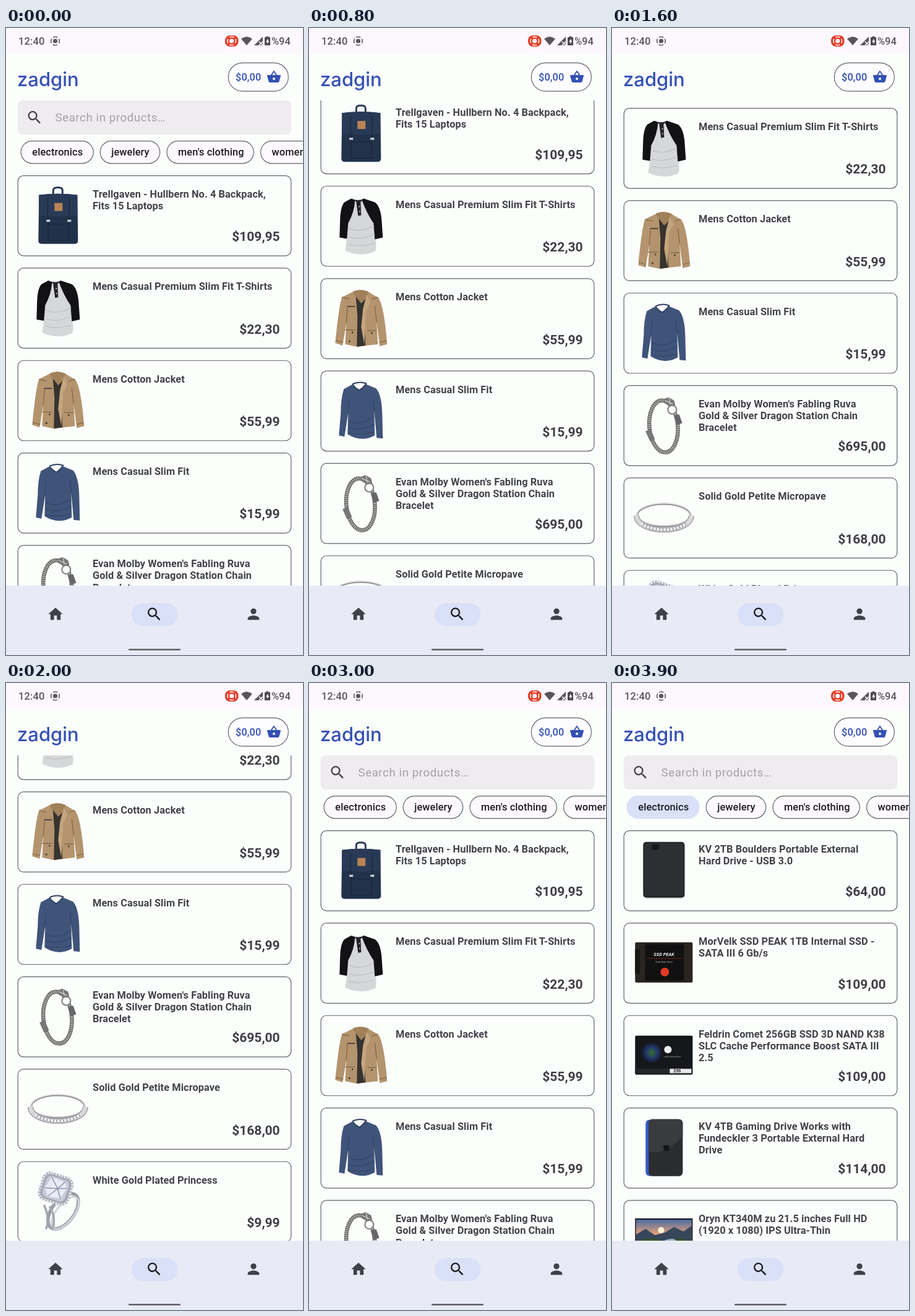
An HTML page that plays this animation: 480 px wide and 1013 px high, repeating every 4400 ms.

```html
<!DOCTYPE html>
<html lang="en">
<head>
<meta charset="utf-8">
<title>Shop search</title>
<style>
  html, body { margin: 0; width: 100%; height: 100%; overflow: hidden; background: #fcfefc; }
  svg { display: block; width: 100vw; height: 100vh; font-family: Roboto, sans-serif; }
  .title { font-size: 16.33px; font-weight: 700; letter-spacing: .09px; fill: #42424a; }
  .price { font-size: 21px; font-weight: 700; fill: #3e3e46; text-anchor: end; }
  .label { font-size: 16.33px; font-weight: 500; letter-spacing: .117px; fill: #1a1b20; }
  .status { font-size: 16.5px; font-weight: 500; fill: #58555b; }
  .hint { font-size: 18.67px; letter-spacing: .583px; fill: #a4a2a8; }
  .logo { font: 500 31px Inter, sans-serif; fill: #3450b4; }
</style>
</head>
<body>
<svg id="stage" viewBox="0 0 480 1013" preserveAspectRatio="none"></svg>
<script>
const LOOP = 4400, STEP = 100;
const PITCH = 149.33, LIST_TOP = 219.33, HEADER = 102.3;
const BG = '#fcfefc', INK = '#3f4149', LINE = '#62636d', BLUE = '#3450b4';

const path = (d, fill, extra = '') => `<path d="${d}" fill="${fill}" ${extra}/>`;
const line = (d, stroke, w = 1, extra = '') => path(d, 'none', `stroke="${stroke}" stroke-width="${w}" ${extra}`);
const box = (x, y, w, h, fill, r = 0, extra = '') =>
  `<rect x="${x}" y="${y}" width="${w}" height="${h}" rx="${r}" fill="${fill}" ${extra}/>`;
const dot = (x, y, r, fill, extra = '') => `<circle cx="${x}" cy="${y}" r="${r}" fill="${fill}" ${extra}/>`;
const oval = (x, y, rx, ry, stroke, w, extra = '') =>
  `<ellipse cx="${x}" cy="${y}" rx="${rx}" ry="${ry}" fill="none" stroke="${stroke}" stroke-width="${w}" ${extra}/>`;
const text = (cls, x, y, s, extra = '') => `<text class="${cls}" x="${x}" y="${y}" ${extra}>${s}</text>`;
const icon = (x, y, scale, d, fill) =>
  `<g transform="translate(${x} ${y}) scale(${scale}) translate(-12 -12)">${path(d, fill)}</g>`;
const outline = `stroke="${LINE}" stroke-width="1.17"`;

const ICONS = {
  home: 'M10 20v-6h4v6h5v-8h3L12 3 2 12h3v8z',
  search: 'M15.5 14h-.79l-.28-.27A6.47 6.47 0 0 0 16 9.5 6.5 6.5 0 1 0 9.5 16c1.61 0 3.09-.59 4.23-1.57l.27.28v.79l5 4.99L20.49 19zm-6 0C7.01 14 5 11.99 5 9.5S7.01 5 9.5 5 14 7.01 14 9.5 11.99 14 9.5 14z',
  person: 'M12 12a4 4 0 1 0 0-8 4 4 0 0 0 0 8zm0 2c-2.67 0-8 1.34-8 4v2h16v-2c0-2.66-5.33-4-8-4z',
  basket: 'M17.21 9l-4.38-6.56a1 1 0 0 0-1.66 0L6.79 9H2a1 1 0 0 0-.96 1.27l2.54 9.27A2 2 0 0 0 5.5 21h13a2 2 0 0 0 1.93-1.46l2.54-9.27A1 1 0 0 0 22 9zM9 9l3-4.4L15 9zm3 8a2 2 0 1 1 0-4 2 2 0 0 1 0 4z'
};

// Product pictures, each in a 93 px square.
const ART = {
  backpack: () =>
    line('M39 14V6q0-5 6-5h3q6 0 6 5v8', '#2b3c57', 3) +
    path('M16 13Q47 9 78 13L79 87Q79 92 73 92H21Q15 92 15 87Z', '#22324b') +
    path('M16 13Q47 9 78 13V46Q47 50 16 46Z', '#283a56') +
    line('M31 49V86H64V49M31 60H64M30 18V54M65 18V54', '#18263b', 1.2) +
    box(28, 53, 6, 3.5, '#c9ced6') + box(62, 53, 6, 3.5, '#c9ced6') +
    box(41, 26, 13, 13, '#b98455'),
  raglan: () =>
    path('M30 3Q40 8 50 3L64 8 70 30 69 64Q73 78 70 87Q46 98 21 86Q26 60 24 34L27 10Z', '#d6d7d9') +
    path('M31 2L20 8Q14 14 13 34L12 65 24 67 26 42Q36 24 37 5Z', '#121215') +
    path('M51 2L69 8Q78 14 80 36L82 65 69 68 67 42Q56 26 48 4Z', '#121215') +
    path('M32 2Q41 7 52 2Q46 9 41 9Z', '#2a2a2e') + path('M39 8L46 7 47 29 42 30Z', '#222226') +
    dot(44, 15, 1, '#ddd') + dot(44.5, 23, 1, '#ddd') +
    line('M28 50Q45 58 68 46M28 64Q44 70 69 60M27 76Q46 81 68 74', '#bfc0c4', 1.3),
  jacket: () =>
    path('M32 4L16 12Q11 25 5 86L17 90 23 54 21 88 40 92 56 90 74 88 72 52 77 91 89 88Q84 26 75 13L58 3Z', '#b3946e') +
    path('M38 6L56 6 51 32 54 90 40 92 41 42Z', '#37332f') +
    path('M33 3Q45 -3 59 3L54 15 47 22 36 8Z', '#a08159') + path('M56 8L62 20 55 34 52 88 47 60 50 30Z', '#c4a57e') +
    line('M23 54L25 26M72 52L69 26M21 65H37M57 66H72M16 12L28 15M64 15L74 12M6 82L18 85M77 85L88 82', '#80633f', 1.2) +
    line('M25 27H37', '#3a342c', 1.6) + dot(28, 83, 1.5, '#3a342c') + dot(33, 69, 1.3, '#3a342c') + dot(64, 70, 1.3, '#3a342c'),
  sweater: () =>
    path('M32 4L19 11Q14 26 14 50L11 86 20 88 26 50 25 84Q47 98 69 86L68 46 72 90 82 91 81 50Q80 20 71 10L54 3 44 13Z', '#40547a') +
    line('M33 3Q36 9 44 13Q51 9 55 2Q44 -2 33 3', '#2f4062', 2) +
    line('M26 50L27 28M68 46L66 26M28 62Q47 72 67 56M27 73Q46 80 68 68M27 82Q48 87 68 80', '#324569', 1.3),
  bracelet: () =>
    oval(46, 48, 23, 42, '#666664', 6.5, 'transform="rotate(-5 46 48)"') +
    oval(46, 48, 23, 42, '#bdbdba', 4.5, 'transform="rotate(-5 46 48)" stroke-dasharray="1.4 1.7"') +
    line('M21 54L28 70', '#77777a', 9) + line('M67 30L72 44', '#66666a', 9) +
    dot(60, 21, 7, BG, 'stroke="#858585" stroke-width="2.2"') +
    path('M45 4L54 1 63 6 65 14 57 15 48 11Z', '#77777a') + line('M48 6L61 12M55 3L57 13', '#d0d0d0', 1.3),
  band: () =>
    oval(46.5, 42, 43, 18, '#8d8c8f', 3) + oval(46.5, 41, 43, 18, '#dedcdf', 1.5) +
    line('M2 43C4 73 89 73 91 43', '#949398', 9) + line('M2 43C4 73 89 73 91 43', '#d9d8dc', 6.5) +
    line('M10 55C28 69 65 69 83 55', '#8b8a90', 4.4) +
    line('M10 55C28 69 65 69 83 55', '#f6f6f9', 3.8, 'stroke-dasharray="4 1.4"'),
  princess: () =>
    oval(55, 62, 18, 33, '#9b9ca6', 5.5, 'transform="rotate(37 55 62)"') +
    oval(58, 65, 14, 31, '#d2d3da', 3, 'transform="rotate(38 58 65)"') +
    line('M24 52Q35 76 27 91M33 54Q44 72 38 90', '#a4a5ad', 3.5) +
    `<g transform="rotate(18 44 26)">` + box(17, 2, 52, 48, '#a5a6b2', 13) +
    box(18.5, 3.5, 49, 45, 'none', 12, 'stroke="#e4e4ea" stroke-width="4" stroke-dasharray="3 1.8"') +
    box(24, 8, 38, 36, '#c7cad9', 8) +
    path('M31 10L54 11 60 20 55 39 34 42 26 30Z', '#e9ebf4') +
    line('M31 10L46 25 54 11M46 25L60 20M46 25L55 39M46 25L34 42M46 25L26 30', '#8e92ab', 1.5) + '</g>',
  drive: () =>
    box(14, 2, 67, 90, '#9b9b9d', 6, 'opacity=".35"') + box(13, 0, 67, 90, '#242527', 5) +
    box(15, 2, 63, 85, '#2e2f32', 4) + box(27, 4, 12, 9, '#191a1c'),
  ssd: () =>
    box(0, 13, 93, 65, '#292521', 2) + box(16, 16, 63, 59, '#111', 1) + box(0, 24, 8, 40, '#191714') +
    text('', 30, 35, 'SSD PEAK', 'font-size="7.4" font-style="italic" font-weight="700" fill="#eee"') +
    line('M18 39H78', '#8c2720', .8) +
    text('', 33, 46, 'Solid State Drive', 'font-size="3.8" fill="#bbb"') +
    dot(48, 61, 7, '#e13a25'),
  flash: () =>
    box(0, 14.5, 93, 63, '#15171b', 2) + dot(27, 42, 17, 'url(#glow)') +
    dot(53, 37, 6, '#eee') +
    text('', 46, 50, 'solid state drive', 'font-size="4" fill="#aaa"') +
    box(0, 67.5, 93, 8, '#23262b') + box(56, 68, 35, 7, '#e9e9e9') +
    text('', 62, 74, '256', 'font-size="7" font-weight="700" fill="#222"'),
  gaming: () =>
    path('M22 1Q17 2 17 8V85Q17 91 24 92L30 90V1Z', '#3559c4') +
    path('M27 0H71Q77 1 77 6V85Q77 91 71 92H27Q22 91 22 86V6Q22 1 27 0Z', '#2b2c2e') +
    path('M27 0H71Q77 1 77 6V28Q46 60 22 52V6Q22 1 27 0Z', '#3a3b3e') + box(46, 42, 9, 9, '#151617'),
  monitor: () =>
    box(0, 11, 93, 60, '#17171a') + box(1.5, 13, 90, 54, 'url(#sky)') +
    path('M1.5 37L17 28 32 38 48 34 63 25 78 32 91.5 23V67H1.5Z', '#37465a') +
    path('M1.5 49Q28 38 45 49Q64 40 91.5 47V67H1.5Z', '#38562d') +
    path('M30 67Q40 43 62 44L72 50 50 67Z', '#9cb5c9') + dot(42, 30, 5, '#fff3d4')
};

const GOODS = [
  ['backpack', '$109,95', 'Trellgaven - Hullbern No. 4 Backpack,', 'Fits 15 Laptops'],
  ['raglan', '$22,30', 'Mens Casual Premium Slim Fit T-Shirts'],
  ['jacket', '$55,99', 'Mens Cotton Jacket'],
  ['sweater', '$15,99', 'Mens Casual Slim Fit'],
  ['bracelet', '$695,00', "Evan Molby Women's Fabling Ruva", 'Gold &amp; Silver Dragon Station Chain', 'Bracelet'],
  ['band', '$168,00', 'Solid Gold Petite Micropave'],
  ['princess', '$9,99', 'White Gold Plated Princess']
];
const ELECTRONICS = [
  ['drive', '$64,00', 'KV 2TB Boulders Portable External', 'Hard Drive - USB 3.0'],
  ['ssd', '$109,00', 'MorVelk SSD PEAK 1TB Internal SSD -', 'SATA III 6 Gb/s'],
  ['flash', '$109,00', 'Feldrin Comet 256GB SSD 3D NAND K38', 'SLC Cache Performance Boost SATA III', '2.5'],
  ['gaming', '$114,00', 'KV 4TB Gaming Drive Works with', 'Fundeckler 3 Portable External Hard', 'Drive'],
  ['monitor', '$599,00', 'Oryn KT340M zu 21.5 inches Full HD', '(1920 x 1080) IPS Ultra-Thin']
];

const card = ([art, price, ...lines], i) =>
  `<g transform="translate(0 ${238 + i * PITCH})">` +
  box(19.25, .58, 441.5, 129.5, BG, 9, outline) +
  `<g transform="translate(37.33 18.67)">${ART[art]()}</g>` +
  lines.map((s, n) => text('title', 140, 36 + n * 19.14, s)).join('') +
  text('price', 442.67, 106.3, price) + '</g>';

const chip = (x, w, tx, s, id = '') =>
  box(x, 182.6, w, 36.2, '#fdf9fd', 18.1, `${outline} ${id && `id="${id}"`}`) + text('label', tx, 206, s);

const target = (x, y, color) =>
  dot(x, y, 3.6, color) + dot(x, y, 6.8, 'none', `stroke="${color}" stroke-width="1.6" stroke-dasharray="7.4 3.28" stroke-dashoffset="3.7"`);

const statusBar =
  box(0, 0, 480, 42, '#fcf8fd') + text('status', 20, 27, '12:40', 'letter-spacing=".1"') + target(79.5, 21, '#58555b') +
  box(354, 12, 21.5, 18, '#e63a25', 8) + target(364.7, 21, '#fff') +
  path('M380 17.5Q389 10.5 398 17.5L389 28Z', '#58555b') +
  path('M415 14V28H401Z', '#58555b') + line('M409 22L415 28M415 22L409 28', '#fcf8fd', 1.6) +
  path('M420.5 13.5H424.5V15H427V28H418V15H420.5Z', '#4b484e') + path('M423.5 17L420 22.5H422.3V26L425.5 20.8H423.5Z', '#fcf8fd') +
  text('status', 429, 27, '%94');

const topBar =
  text('logo', 18, 94, 'zadgin') +
  box(359.3, 56.3, 97, 45.8, '#fdfcfe', 22.9, outline) +
  text('label', 371, 85, '$0,00', `style="fill:${BLUE}"`) + icon(433, 79, 1, ICONS.basket, BLUE);

const searchBar =
  box(18.67, 116.67, 442.67, 55.67, '#efecf0', 9) +
  icon(46, 144.5, 7 / 6, ICONS.search, '#434148') + text('hint', 79.5, 151.3, 'Search in products…');

const chips =
  chip(24.2, 117, 42.3, 'electronics', 'first') + chip(152.2, 96.5, 170.2, 'jewelery') +
  chip(260, 140.3, 278, "men's clothing") + chip(411.6, 166, 429.6, "women's clothing") +
  box(24, 182, 117.5, 37.3, '#000', 18.6, 'id="tap" opacity="0"');

const navBar =
  box(0, 901, 480, 112, '#e8ebf5') + box(203, 929, 74.5, 37.3, '#dae0f7', 18.6) +
  icon(80, 947, 7 / 6, ICONS.home, INK) + icon(239.5, 947, 7 / 6, ICONS.search, '#17191f') +
  icon(400, 947, 7 / 6, ICONS.person, INK) + box(198, 1003, 84, 2.4, '#5c5d64', 1.2);

document.getElementById('stage').innerHTML = `<defs>
  <clipPath id="view"><rect id="viewBox" x="0" width="480" height="900"/></clipPath>
  <clipPath id="row"><rect x="18.67" y="110" width="442.67" height="120"/></clipPath>
  <radialGradient id="glow"><stop stop-color="#35702c"/><stop offset=".55" stop-color="#22366f"/><stop offset="1" stop-color="#15171b"/></radialGradient>
  <linearGradient id="sky" x2="0" y2="1"><stop stop-color="#4a6ba0"/><stop offset=".45" stop-color="#e9a27b"/></linearGradient></defs>` +
  box(0, 0, 480, 1013, BG) + statusBar + topBar +
  `<g clip-path="url(#view)"><g id="goods">${GOODS.map(card).join('')}` +
  box(18.67, 238 + 3 * PITCH, 442.67, 130.67, '#000', 9.3, 'id="press" opacity="0"') +
  `</g><g id="found">${ELECTRONICS.map(card).join('')}</g></g>` +
  `<g id="header"><g id="search">${searchBar}</g><g id="chips"><g id="chipRow">${chips}</g></g></g>` + navBar;

const el = Object.fromEntries([...document.querySelectorAll('[id]')].map(e => [e.id, e]));
const set = (id, name, value) => el[id].setAttribute(name, value);
const clamp = x => Math.min(1, Math.max(0, x));
const linear = u => u, smooth = u => u * u * (3 - 2 * u);

// Value at time t along [time, value] pairs.
function along(keys, t, ease = linear) {
  if (t <= keys[0][0]) return keys[0][1];
  for (let i = 1; i < keys.length; i++) {
    const [t0, a] = keys[i - 1], [t1, b] = keys[i];
    if (t <= t1) return a + (b - a) * ease((t - t0) / (t1 - t0));
  }
  return keys[keys.length - 1][1];
}

// Critically damped spring from 0 to 1.
function spring(ms) {
  const x = Math.max(0, ms) * .02;
  return 1 - (1 + x) * Math.exp(-x);
}

const HIDE = 482, SHOW = 2040;
const DRAG = [[400, 0], [500, 13], [1200, 53]];
const FLING = [[1200, 53], [2000, 259], [2350, 0]];
const PRESS = [[300, 0], [400, .06], [500, .12], [700, 0]];
const TAP = [[3200, 0], [3400, .15], [3500, .15], [3700, 0]];

function render(t) {
  let k = t < SHOW ? 1 - spring(t - HIDE) : spring(t - SHOW);
  if (k > .99) k = 1;
  const gone = t < SHOW && k < .02;
  const scroll = t < 1200 ? along(DRAG, t) : along(FLING, t, smooth);
  const lift = gone ? HEADER : 0;

  set('viewBox', 'y', LIST_TOP - lift - 2 * (lift ? 0 : 1));
  set('goods', 'transform', `translate(0 ${-scroll - lift})`);
  set('goods', 'opacity', clamp(1 - (t - 3300) / 270));
  set('found', 'opacity', clamp((t - 3600) / 250));
  set('press', 'opacity', along(PRESS, t));

  set('header', 'opacity', gone ? 0 : k);
  for (const [id, y] of [['search', 144.5], ['chips', 200.7]])
    set(id, 'transform', `translate(240 ${y}) scale(${k}) translate(-240 ${-y})`);
  set('chipRow', 'clip-path', k < 1 ? 'url(#row)' : 'none');

  const picked = t >= 3400;
  set('first', 'fill', picked ? '#dae0f7' : '#fdf9fd');
  set('first', 'stroke', picked ? '#dae0f7' : LINE);
  set('tap', 'opacity', along(TAP, t));
}

const start = performance.now();
function tick() {
  const t = (performance.now() - start) % LOOP;
  render(Math.floor(t / STEP) * STEP);
  requestAnimationFrame(tick);
}
tick();
</script>
</body>
</html>
```
